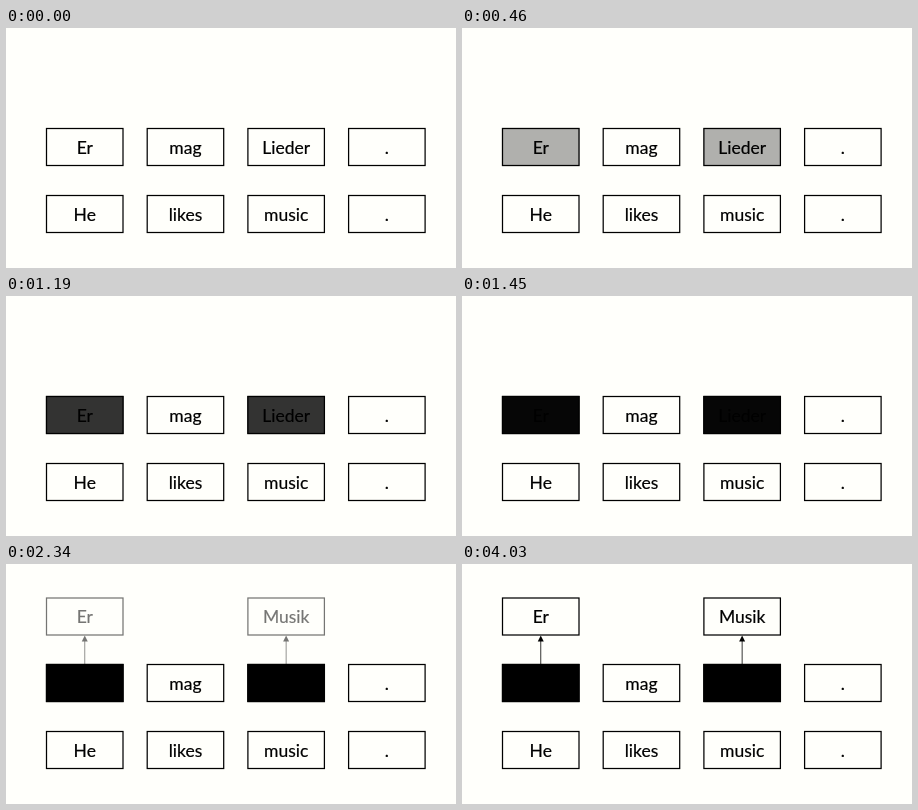
Recreate the animation shown at these times as an HTML page. Size 450 by 240 pixels, loop 5010 ms.

```html
<!DOCTYPE html>
<html lang="en">
<head>
<meta charset="utf-8">
<title>Word replacement</title>
<style>
  html, body { margin: 0; width: 100%; height: 100%; overflow: hidden; background: #fffffb; }
  svg { display: block; width: 450px; height: 240px; }
  rect { fill: none; stroke: #000; stroke-width: 1.25; }
  .mask { fill: #000; }
  text { font: 17.5px Lato, Carlito, sans-serif; text-anchor: middle; stroke: #000; stroke-width: .2; }
  line { stroke: #000; stroke-width: .8; }
  .mask, .swap { opacity: 0; }
</style>
</head>
<body>
<svg id="stage" viewBox="0 0 450 240"></svg>
<script>
const LOOP = 5010;
const LEFT = 40.5, PITCH = 100.7;
const ROWS = { top: 34, mid: 100.5, low: 167.5 };
const W = 76.5, H = 37;
const stage = document.getElementById('stage');
const colX = col => LEFT + col * PITCH;

function add(parent, tag, attrs = {}, text = '') {
  const el = document.createElementNS('http://www.w3.org/2000/svg', tag);
  for (const key in attrs) el.setAttribute(key, attrs[key]);
  el.textContent = text;
  return parent.appendChild(el);
}

function box(parent, col, y, word) {
  const x = colX(col);
  add(parent, 'rect', { x, y, width: W, height: H });
  add(parent, 'text', { x: x + W / 2, y: y + 25.2 }, word);
}

function arrow(parent, x) {
  const tip = ROWS.top + H + .5;
  add(parent, 'line', { x1: x, y1: ROWS.mid, x2: x, y2: tip + 4 });
  add(parent, 'path', { d: `M${x} ${tip}l3 6h-6z` });
}

function fadeIn(el, start, end) {
  el.animate([
    { opacity: 0, offset: 0 },
    { opacity: 0, offset: start / LOOP },
    { opacity: 1, offset: end / LOOP },
    { opacity: 1, offset: 1 }
  ], { duration: LOOP, iterations: Infinity }).startTime = 0;
}

['Er', 'mag', 'Lieder', '.'].forEach((word, i) => box(stage, i, ROWS.mid, word));
['He', 'likes', 'music', '.'].forEach((word, i) => box(stage, i, ROWS.low, word));

// Black out two words, then bring in their replacements.
for (const [col, word] of [[0, 'Er'], [2, 'Musik']]) {
  const mask = add(stage, 'rect', { class: 'mask', x: colX(col), y: ROWS.mid, width: W, height: H });
  const swap = add(stage, 'g', { class: 'swap' });
  box(swap, col, ROWS.top, word);
  arrow(swap, colX(col) + W / 2);
  fadeIn(mask, 0, 1490);
  fadeIn(swap, 1530, 3030);
}
</script>
</body>
</html>
```
